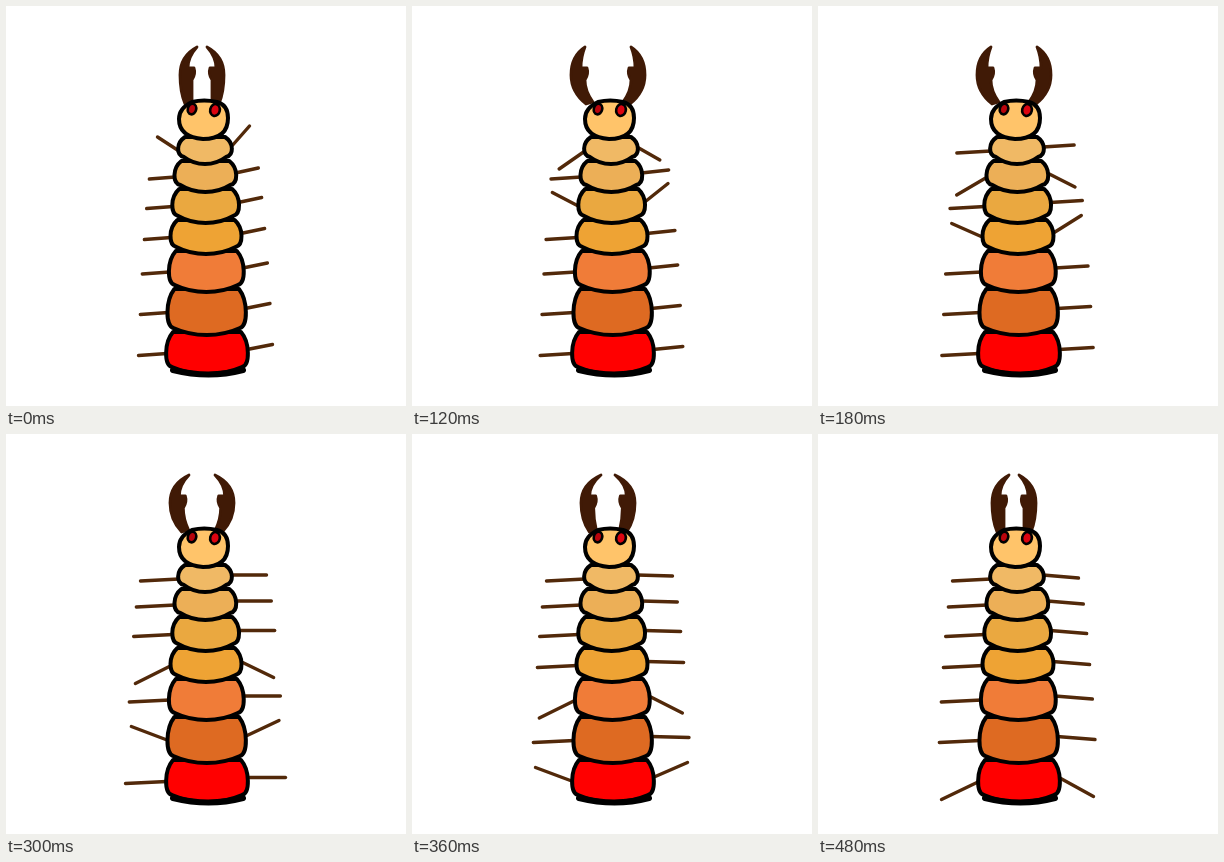
Write an HTML page with a canvas that moves like this. It is 400 px wide and 400 px high and loops after 540 ms.

```html
<!DOCTYPE html>
<html lang="en">
<head>
<meta charset="utf-8">
<title>Crawling beetle larva</title>
<style>
  html, body { margin: 0; height: 100%; overflow: hidden; background: #fff; }
  canvas { display: block; }
</style>
</head>
<body>
<canvas id="stage" width="400" height="400"></canvas>
<script>
const ctx = document.getElementById('stage').getContext('2d');
const STEP = 60, STEPS = 9;
const LEG = '#52290a', JAW = '#401a06';
const LEFT = -1, RIGHT = 1;

const fills = ['#f0b965', '#ecaf57', '#eaa840', '#eea334', '#f07c38', '#de6a22', '#ff0000'];
const seams = [134, 158, 186, 217, 248, 286, 329, 368];

// The body widens towards the tail and leans slightly to the right.
const segments = fills.map((fill, n) => ({
  fill,
  x: 199 + n / 3,
  half: 27 + 14 * (n / 6) ** 0.7,
  top: seams[n] - 3,
  low: seams[n + 1] - 7,
  bottom: seams[n + 1]
}));

const clamp01 = v => Math.max(0, Math.min(1, v));
const lerp = (a, b, t) => a + (b - a) * t;

function shape(d, fill, stroke, width) {
  const path = new Path2D(d);
  if (fill) { ctx.fillStyle = fill; ctx.fill(path); }
  ctx.strokeStyle = stroke;
  ctx.lineWidth = width;
  ctx.stroke(path);
}

// A wave runs down the body: leg n rises at step n and drops two steps later.
function drawLeg({ x, half, top, low }, n, side, step) {
  const swing = [-1, 0, 1][step - n] || 0;
  const grow = clamp01((step - 1) / 3);
  const reach = 24 + n / 2 - side * 1.5 + 13 * grow - 4 * Math.abs(swing);
  const droop = side === LEFT ? 2 : step - 5;
  const rootX = x + side * (half - 1);
  const rootY = (top + low) / 2 + (side === LEFT ? 4 : 0);
  shape(`M${rootX} ${rootY} L${rootX + side * reach} ${rootY + droop + 16 * swing}`, null, LEG, 3.4);
}

// Jaws mirror each other; distances are measured from the centre line.
function drawJaw(side, step) {
  const open = clamp01(Math.min(step / 2, (7 - step) / 3));
  const outer = lerp(22, 37, open), tip = lerp(5, 23, open ** 2);
  const tooth = lerp(7, 20, open), base = lerp(14, 19, open);
  const at = (d, y) => `${196 + side * d} ${y} `;
  shape('M' + at(base + 3, 98) + 'Q' + at(outer, 86) + at(outer, 69)
    + 'Q' + at(outer, 50) + at(tip, 41) + 'Q' + at(tooth + 7, 51) + at(tooth + 7, 62)
    + 'L' + at(tooth + 1, 62) + 'Q' + at(tooth - 1, 68) + at(tooth + 3, 74)
    + 'Q' + at(tooth + 3, 85) + at(base - 4, 96) + 'Z', JAW, JAW, 2.8);
}

function drawSegment({ x, half, top, low, bottom, fill }) {
  const l = x - half, r = x + half;
  const shoulder = top + (low - top) * 0.3;
  const belly = lerp(low, bottom, 4 / 3);
  shape(`M${l + 7} ${top} C${l - 2} ${shoulder} ${l - 2} ${low - 2} ${l + 6} ${low}
    C${x - half / 3} ${belly} ${x + half / 3} ${belly} ${r - 6} ${low}
    C${r + 2} ${low - 2} ${r + 2} ${shoulder} ${r - 7} ${top} Z`, fill, '#000', 4);
}

function drawEye(x, y, rx, ry, fill) {
  ctx.beginPath();
  ctx.ellipse(x, y, rx, ry, 0.2, 0, 7);
  ctx.fillStyle = fill;
  ctx.fill();
  ctx.lineWidth = 2.6;
  ctx.stroke();
}

function draw() {
  const step = Math.floor(performance.now() / STEP) % STEPS;
  ctx.fillStyle = '#fff';
  ctx.fillRect(0, 0, 400, 400);
  ctx.lineCap = ctx.lineJoin = 'round';
  for (const side of [LEFT, RIGHT]) {
    segments.forEach((segment, n) => drawLeg(segment, n, side, step));
    drawJaw(side, step);
  }
  [...segments].reverse().forEach(drawSegment);
  shape('M167 364 Q203 373 237 364', null, '#000', 6);
  shape('M186 96 Q198 93 211 96 Q222 99 222 112 Q222 133 197 133 Q173 131 173 113 Q173 102 186 96 Z',
    '#ffc46a', '#000', 4);
  drawEye(186, 103, 4.2, 5.4, '#b8040c');
  drawEye(209, 104, 4.8, 6, '#dc0410');
  requestAnimationFrame(draw);
}
draw();
</script>
</body>
</html>
```
